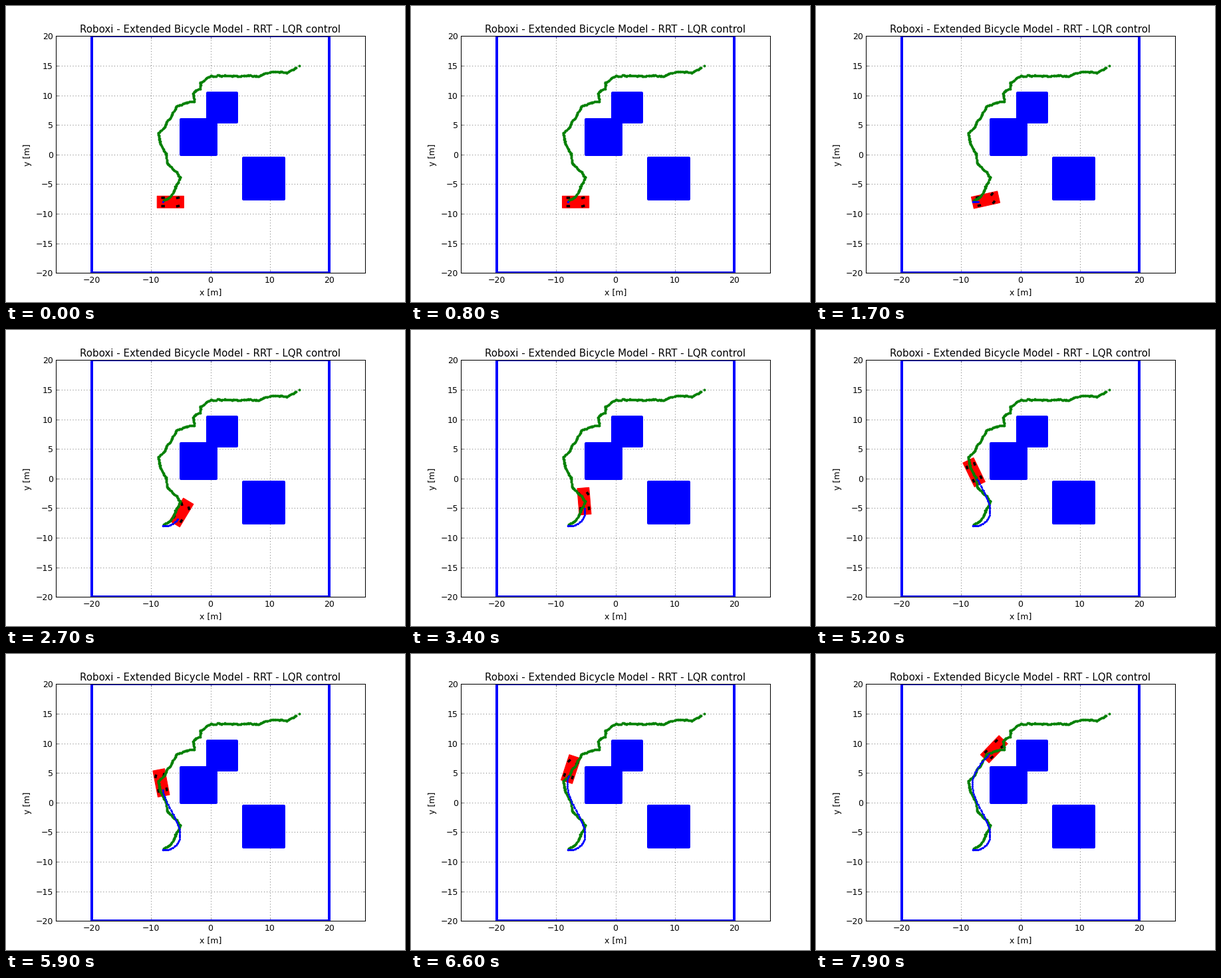
A matplotlib script that plays this animation: 600 px wide and 446 px high, repeating every 8 s.

```python
import numpy as np
import matplotlib.pyplot as plt
from matplotlib.animation import FuncAnimation
from matplotlib.patches import Polygon

W, H, DPI = 600, 446, 75
LEFT, RIGHT, TOP, BOTTOM = 75, 540, 45.3, 402.4   # axes box in pixels
FRAMES, STEP = 80, 100
DOT = 3.8

plt.rcParams.update({
    "font.family": "DejaVu Sans", "font.size": 12,
    "axes.linewidth": 1.0, "axes.titlesize": 14.45, "axes.titlepad": 4.8,
    "axes.labelpad": 5,
    "xtick.direction": "in", "ytick.direction": "in",
    "xtick.top": True, "ytick.right": True,
    "xtick.major.size": 4, "ytick.major.size": 4,
    "xtick.major.width": 0.5, "ytick.major.width": 0.5,
    "xtick.major.pad": 4, "ytick.major.pad": 4,
    "lines.scale_dashes": False,
})

fig = plt.figure(figsize=(W / DPI, H / DPI), dpi=DPI, facecolor="white")
ax = fig.add_axes([LEFT / W, 1 - BOTTOM / H,
                   (RIGHT - LEFT) / W, (BOTTOM - TOP) / H])
half_w = 20 * (RIGHT - LEFT) / (BOTTOM - TOP)
ax.set(xlim=(-half_w, half_w), ylim=(-20, 20),
       xticks=range(-20, 21, 10), yticks=range(-20, 21, 5),
       xlabel="x [m]", ylabel="y [m]",
       title="Roboxi - Extended Bicycle Model - RRT - LQR control")
ax.grid(True, color="black", lw=0.5, ls=(0, (1, 3)))
ax.set_axisbelow(True)


def box(x0, y0, x1, y1):
    return np.array([(x0, y0), (x1, y0), (x1, y1), (x0, y1)])


def square(x, y, size, fill="blue"):
    ax.add_patch(Polygon(box(x, y, x + size, y + size), fc=fill, ec="blue",
                         lw=DOT, joinstyle="round", zorder=2))


square(-20, -20, 40, fill="none")
for x, y, size in [(-5, 0, 6), (-0.5, 5.5, 5), (5.5, -7.5, 7)]:
    square(x, y, size - 0.1)


def planned_path():
    """Main bends of the plan, roughened by smooth seeded noise."""
    bends = np.array([
        (-7.9, -7.8), (-6.8, -7.3), (-5.0, -3.8), (-6.4, -2.4), (-7.4, -1.3),
        (-7.5, 0.1), (-8.4, 1.6), (-8.8, 3.5), (-7.7, 4.7), (-6.3, 7.2),
        (-5.8, 8.0), (-4.1, 8.8), (-2.9, 9.0), (-3.0, 10.5), (-1.8, 11.2),
        (-1.7, 12.3), (0, 13.3), (8, 13.3), (10.1, 14.1), (12.9, 13.8),
        (14.5, 14.6)])
    rng = np.random.default_rng(4)
    dist = np.r_[0, np.cumsum(np.hypot(*np.diff(bends, axis=0).T))]
    s = np.arange(0, dist[-1], 0.18)
    noise = rng.normal(0, 0.14, (2, s.size))
    x, y = (np.interp(s, dist, c) + np.convolve(n, np.ones(4) / 4, "same")
            for c, n in zip(bends.T, noise))
    return np.r_[x, 15], np.r_[y, 15]


ax.plot(*planned_path(), "o", color="green", ms=DOT, mew=0, zorder=4)

# The car eases up to cruising speed after a short wait.
CRUISE, LAG, WAIT = 3.6, 1.95, 0.62


def travelled(t):
    t = np.maximum(t - WAIT, 0)
    return CRUISE * (t - LAG * (1 - np.exp(-t / LAG)))


def heading(s):
    """A long left turn, then a gentler right turn."""
    left = 122 * np.tanh((s / 4.55) ** 1.4)
    right = 39 * (1 + np.tanh((s - 13.95) / 3))
    return np.radians(left - right)


# Rear axle position: heading integrated along the way
way = np.linspace(0, 20, 2001)
ds = way[1]
angle = heading(way + ds / 2)
way_x = -8 + np.cumsum(np.cos(angle)) * ds
way_y = -8 + np.cumsum(np.sin(angle)) * ds

S = travelled(np.arange(FRAMES) * STEP / 1000)
X, Y, A = np.interp(S, way, way_x), np.interp(S, way, way_y), heading(S)

LENGTH, WIDTH, BACK, BASE, TREAD = 4.5, 2.0, 1.0, 2.5, 0.7
BODY = box(-BACK, -WIDTH / 2, LENGTH - BACK, WIDTH / 2)
WHEEL = box(-0.3, -0.2, 0.3, 0.2)
HUBS = [(x, y) for x in (0, BASE) for y in (-TREAD, TREAD)]
STEER = np.arctan(BASE * (heading(S + 0.05) - A) / 0.05)


def turn(pts, a):
    c, s = np.cos(a), np.sin(a)
    return pts @ np.array([(c, s), (-s, c)])


body = ax.add_patch(Polygon(BODY, fc="red", ec="red", lw=1, zorder=3))
wheels = [ax.add_patch(Polygon(WHEEL, fc="black", ec="none", zorder=3.5))
          for _ in HUBS]
trail, = ax.plot([], [], "o", color="blue", ms=3, mew=0, zorder=5)


def draw(k):
    at = X[k], Y[k]
    body.set_xy(turn(BODY, A[k]) + at)
    for hub, wheel in zip(HUBS, wheels):
        shape = turn(WHEEL, STEER[k] if hub[0] else 0)
        wheel.set_xy(turn(shape + hub, A[k]) + at)
    trail.set_data(X[:k + 1], Y[:k + 1])
    return [body, trail, *wheels]


anim = FuncAnimation(fig, draw, frames=FRAMES, interval=STEP, repeat=True,
                     repeat_delay=0, blit=False)
plt.show()
```
